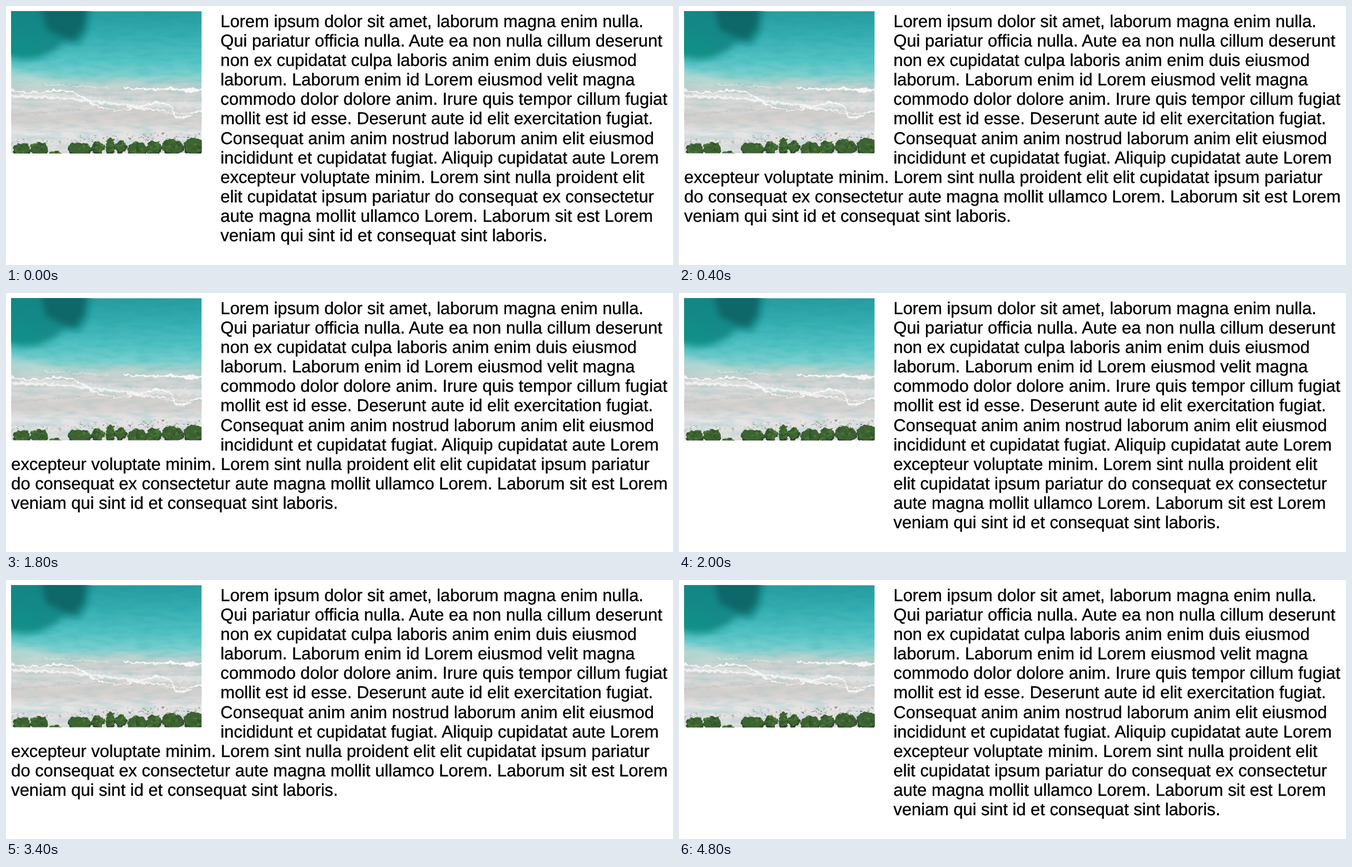
Animation, 1199 px wide and 467 px high, one loop 5 s. Source, as an HTML page:

```html
<!DOCTYPE html>
<html lang="la">
<head>
<meta charset="utf-8">
<title>Text wrap around an image</title>
<style>
html, body { margin: 0; width: 100%; height: 100%; overflow: hidden; background: #fff; }
svg { display: block; }
text {
  font: 30.82px "Liberation Sans", Arial, sans-serif;
  text-rendering: geometricPrecision;
  stroke: #000;
  stroke-width: .35px;
}
</style>
</head>
<body>
<svg width="1199" height="467" viewBox="0 0 1199 467">
  <defs>
    <linearGradient id="shore" gradientUnits="userSpaceOnUse" x1="0" y1="9" x2="0" y2="266">
      <stop offset="0" stop-color="#279c9f"/>
      <stop offset=".16" stop-color="#35adb0"/>
      <stop offset=".34" stop-color="#54c3c5"/>
      <stop offset=".45" stop-color="#7dd0ce"/>
      <stop offset=".51" stop-color="#b3d3ce"/>
      <stop offset=".56" stop-color="#d2d3d1"/>
      <stop offset=".69" stop-color="#dbd9d8"/>
      <stop offset=".79" stop-color="#dcd8d7"/>
      <stop offset=".86" stop-color="#e6e4e4"/>
      <stop offset="1" stop-color="#dedddb"/>
    </linearGradient>
    <clipPath id="frame"><rect x="9.5" y="9.5" width="342" height="256"/></clipPath>
    <filter id="soft" x="-30%" y="-30%" width="160%" height="160%"><feGaussianBlur stdDeviation="6"/></filter>
    <filter id="rough" filterUnits="userSpaceOnUse" x="0" y="0" width="361" height="276">
      <feTurbulence type="fractalNoise" baseFrequency=".12" numOctaves="3" seed="4"/>
      <feDisplacementMap in="SourceGraphic" scale="9" xChannelSelector="R" yChannelSelector="G"/>
    </filter>
    <filter id="ripple" filterUnits="userSpaceOnUse" x="9" y="9" width="343" height="257">
      <feTurbulence type="fractalNoise" baseFrequency=".03 .12" numOctaves="3" seed="8"/>
      <feColorMatrix values="0 0 0 0 0  0 0 0 0 .3  0 0 0 0 .33  .9 0 0 0 -.34"/>
    </filter>
  </defs>

  <g clip-path="url(#frame)">
    <rect x="9" y="9" width="343" height="257" fill="url(#shore)"/>
    <rect x="9" y="9" width="343" height="125" filter="url(#ripple)" opacity=".35"/>
    <g filter="url(#soft)">
      <path d="M0 0H152L147 45 133 68 105 66 82 84 48 94 0 90Z" fill="#0f8380" opacity=".85"/>
      <path d="M62 0H146L140 38 122 62 98 55 72 42Z" fill="#0b6062" opacity=".8"/>
      <path d="M0 50L45 62 72 92 30 100 0 92Z" fill="#129286" opacity=".6"/>
      <path d="M0 116L70 126 110 140 60 150 0 142Z" fill="#c3d9d5" opacity=".65"/>
      <path d="M165 136L225 134 260 144 190 150Z" fill="#c9d5d1" opacity=".7"/>
      <path d="M0 190Q90 200 160 188T360 198V212Q180 202 0 214Z" fill="#cdc8c5" opacity=".55"/>
    </g>
    <g filter="url(#rough)" fill="none" stroke="#f6f8f7" stroke-linecap="round">
      <path d="M4 150Q40 160 78 153T150 172 240 181 300 190 360 181" stroke-width="2.5"/>
      <path d="M4 163Q70 164 118 168T200 177 290 191 360 182" stroke-width="4" opacity=".75"/>
      <path d="M30 159Q100 162 150 169T250 177 355 178" stroke-width="11" opacity=".3"/>
      <path d="M212 148Q250 150 282 150T322 153 356 152" stroke-width="2.5"/>
      <path d="M288 148Q318 152 352 151" stroke-width="4"/>
      <path d="M70 142Q130 143 185 148" stroke-width="1.5" opacity=".5"/>
      <path d="M4 198Q70 190 120 188T210 187 360 196" stroke="#c8c2bf" stroke-width="1.5" opacity=".8"/>
    </g>
    <g id="plants" filter="url(#rough)"></g>
  </g>

  <g id="head"></g>
  <g id="narrow"></g>
  <g id="wide"></g>
</svg>
<script>
const $ = id => document.getElementById(id);

function add(parent, tag, attrs, content = "") {
  const el = document.createElementNS("http://www.w3.org/2000/svg", tag);
  for (const name in attrs) el.setAttribute(name, attrs[name]);
  el.textContent = content;
  $(parent).append(el);
}

let seed = 7;
const rand = (min, max) => {
  seed = seed * 16807 % 2147483647;
  return min + (max - min) * seed / 2147483647;
};

// Dry twigs scattered over the sand
for (let i = 0; i < 150; i++) {
  const x = rand(10, 352);
  add("plants", "ellipse", {
    cx: x, cy: 245 - x / 25 + rand(-6, 7),
    rx: rand(.5, 2.4), ry: rand(.4, 1), fill: "#66695f", opacity: rand(.25, .75)
  });
}

// Bushes: centre x, centre y, half width, half height
const bushes = [
  [25, 257, 16, 12], [57, 256, 16, 12], [87, 265, 11, 6], [130, 256, 21, 13],
  [162, 253, 12, 11], [184, 251, 9, 15], [203, 252, 11, 11], [233, 257, 18, 13],
  [263, 254, 13, 13], [296, 252, 20, 14], [335, 251, 19, 16]
];
for (const [x, y, w, h] of bushes) {
  add("plants", "ellipse", { cx: x + 3, cy: y + 3, rx: w, ry: h, fill: "#2b3f28" });
  add("plants", "ellipse", { cx: x + 3, cy: y + 1, rx: w - 1, ry: h - 1, fill: "#3c6330" });
  for (let i = 0; i < 14; i++) {
    add("plants", "circle", {
      cx: x + 3 + rand(-.75, .75) * w, cy: y + rand(-.6, .7) * h, r: rand(1, 3),
      fill: i % 2 ? "#2f5128" : "#4d7a3b", opacity: .8
    });
  }
}

const LEFT = 9.3, INDENT = 385.5;

function lines(id, x, first, text) {
  text.trim().split("\n").forEach((line, i) =>
    add(id, "text", { x, y: 37.7 + 35.15 * (first + i) }, line));
}

lines("head", INDENT, 0, `
Lorem ipsum dolor sit amet, laborum magna enim nulla.
Qui pariatur officia nulla. Aute ea non nulla cillum deserunt
non ex cupidatat culpa laboris anim enim duis eiusmod
laborum. Laborum enim id Lorem eiusmod velit magna
commodo dolor dolore anim. Irure quis tempor cillum fugiat
mollit est id esse. Deserunt aute id elit exercitation fugiat.
Consequat anim anim nostrud laborum anim elit eiusmod
incididunt et cupidatat fugiat. Aliquip cupidatat aute Lorem`);

lines("narrow", INDENT, 8, `
excepteur voluptate minim. Lorem sint nulla proident elit
elit cupidatat ipsum pariatur do consequat ex consectetur
aute magna mollit ullamco Lorem. Laborum sit est Lorem
veniam qui sint id et consequat sint laboris.`);

lines("wide", LEFT, 8, `
excepteur voluptate minim. Lorem sint nulla proident elit elit cupidatat ipsum pariatur
do consequat ex consectetur aute magna mollit ullamco Lorem. Laborum sit est Lorem
veniam qui sint id et consequat sint laboris.`);

function draw() {
  const t = performance.now() % 5000;
  const wrapped = (t >= 400 && t < 2000) || (t >= 3400 && t < 4600);
  $("wide").style.display = wrapped ? "" : "none";
  $("narrow").style.display = wrapped ? "none" : "";
  requestAnimationFrame(draw);
}
draw();
</script>
</body>
</html>
```
